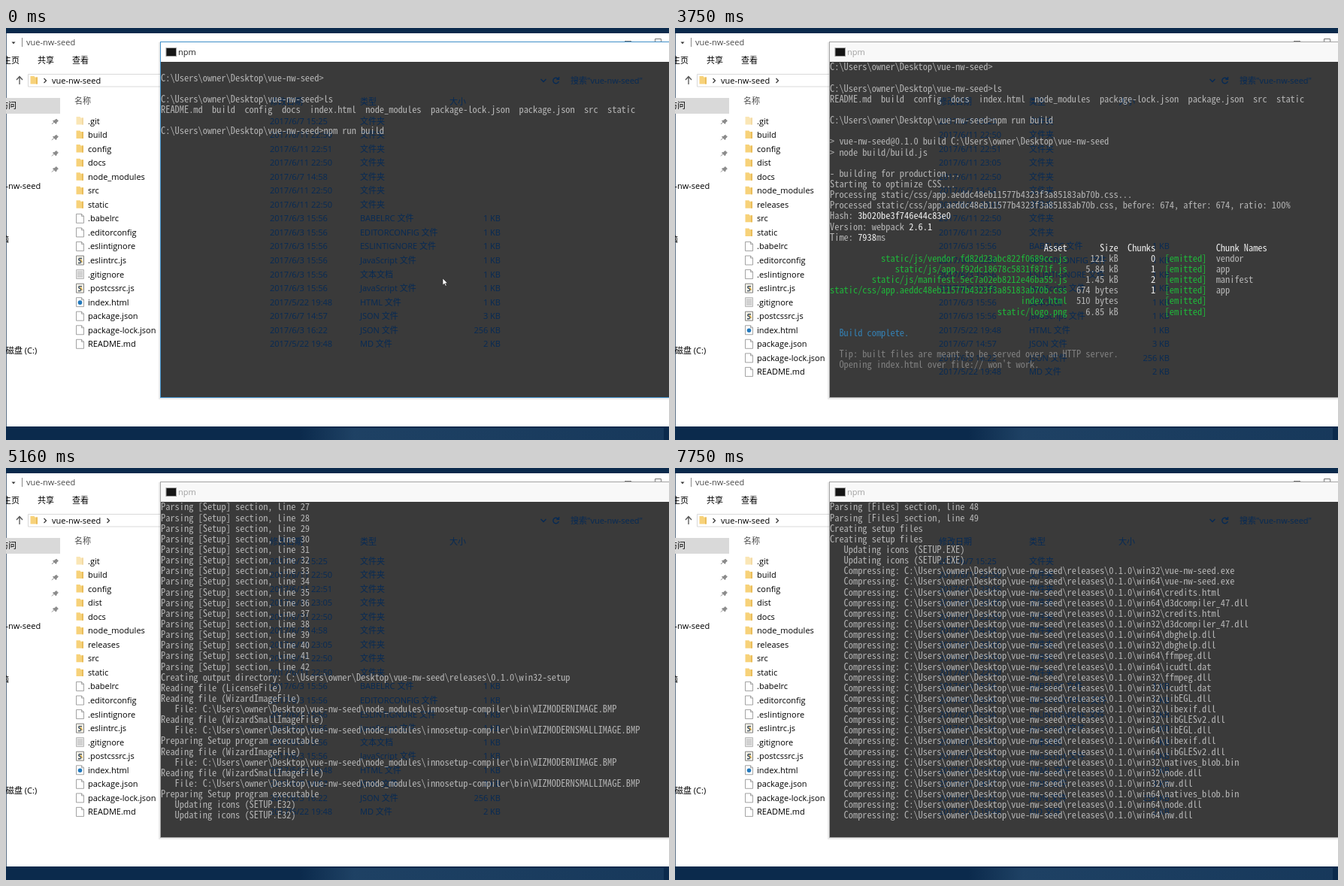
An HTML page that plays this animation: 882 px wide and 548 px high, repeating every 8000 ms.

```html
<!DOCTYPE html>
<html lang="zh-CN">
<head>
<meta charset="utf-8">
<title>npm run build</title>
<style>
html, body { margin: 0; width: 100%; height: 100%; overflow: hidden; background: #0b2a4c; }
#stage { position: absolute; left: 0; top: 0; width: 882px; height: 548px; overflow: hidden; }
svg { position: absolute; left: 0; top: 0; }
text { font: 11px "Open Sans", "Noto Sans CJK SC", sans-serif; white-space: pre; fill: #000; }
text.soft { fill: #4c4c4c; }
.under text { fill: #062a55; }
.end { text-anchor: end; }
#lines {
  position: absolute; left: 206px; top: 44.4px; width: 676px; height: 446px; margin: 0; overflow: hidden;
  font: 12.38px/14.15px "Noto Sans Mono CJK SC", "Liberation Mono", monospace;
  color: #b6b6b6; white-space: pre; font-variant-ligatures: none;
}
#lines div { height: 14.15px; }
b, i, u, em { font-style: normal; font-weight: inherit; text-decoration: none; }
b { color: #f0f0f0; }
i { color: #1fb83a; }
u { color: #3480b4; }
em { color: #808080; }
</style>
</head>
<body>
<div id="stage">
  <svg id="scene" width="882" height="548" viewBox="0 0 882 548">
    <defs>
      <linearGradient id="glow">
        <stop offset="0" stop-color="#23476a" stop-opacity="0"/>
        <stop offset=".15" stop-color="#23476a" stop-opacity=".8"/>
        <stop offset="1" stop-color="#23476a" stop-opacity=".5"/>
      </linearGradient>
      <g id="folder"><path d="M.5 0h5l1 1.500h3.500v9h-9.500z" fill="#f7d27a"/><path d="M8 1.500h2v9h-2z" fill="#e9bd5c"/></g>
      <g id="file"><path d="M.5 -.5h7l3 3v9h-10z" fill="#fff" stroke="#8c8c8c" stroke-width=".8"/><path d="M7.500 -.5v3h3" fill="none" stroke="#8c8c8c" stroke-width=".8"/></g>
      <g id="script"><path d="M.5 -.5h10v12h-10z" fill="#f2efe6" stroke="#777" stroke-width=".9"/><path d="M8 3H4.500q-2 1.500 1 3t0 3H3" fill="none" stroke="#3f4f60" stroke-width="1.400"/><path d="M6 4l2.500 4" stroke="#e0b03c" stroke-width="1.300"/></g>
      <g id="note"><path d="M.5 -.5h10v12h-10z" fill="#e4e4e4" stroke="#aaa" stroke-width=".8"/><path d="M2 2.500h7M2 4.500h7M2 6.500h7M2 8.500h7" stroke="#b6b6b6" stroke-width=".8"/></g>
      <g id="page"><use href="#file"/><circle cx="5.500" cy="6" r="2.800" fill="#2379bd"/></g>
      <path id="pin" d="M1 8l3-3M2.500 3.500l4 4 .8-2 2-2-2.500-2.500-2 2z" fill="#8b8b8b" stroke="#8b8b8b"/>
    </defs>

    <rect width="882" height="548" fill="#0b2a4c"/>
    <rect x="390" y="532" width="485" height="16" fill="url(#glow)"/>
    <rect x="0" y="7" width="882" height="523" fill="#fff"/>
    <path d="M.5 7V530" stroke="#5d7086"/>
    <path d="M7.500 18.500h5l-2.500 2.800z" fill="#333"/>
    <path d="M21.500 13v12" stroke="#888"/>
    <path d="M18 75v-10M14 69l4-4.500 4 4.500" fill="none" stroke="#555" stroke-width="1.300"/>
    <path d="M206 61.500H29.500v16.500H206" fill="none" stroke="#d9d9d9"/>
    <use href="#folder" x="32" y="64"/>
    <path d="M50.500 67l3 3-3 3" fill="none" stroke="#333" stroke-width="1.200"/>
    <path id="crumb" d="M134.500 67l3 3-3 3" fill="none" stroke="#333" stroke-width="1.200"/>
    <rect x="0" y="93" width="72" height="21" fill="#d9d9d9"/>
    <g id="labels"></g>
    <g id="names"></g>

    <path d="M823 17.500h9M863.500 18v-3.500h8v3.500" fill="none" stroke="#777"/>
    <rect x="203" y="19" width="690" height="475" fill="#000" opacity=".08"/>
    <rect x="205" y="18" width="690" height="474" fill="#3a3a3a"/>
    <rect id="bar" x="205" y="18" width="690" height="27"/>
    <rect id="frame" x="205.500" y="18.500" width="690" height="473" fill="none"/>
    <rect x="213" y="26.500" width="13.500" height="11" fill="#151515" stroke="#9b9b9b"/>
    <text id="caption" x="229" y="36">npm</text>
    <g class="under">
      <path d="M711.500 68l3.500 3.500 3.500-3.500M734.500 67.500a3.800 3.800 0 1 0 .8 3.500M735.500 65v3.200h-3.200" fill="none" stroke="#062a55" stroke-width="1.400"/>
      <g id="heads"></g>
      <g id="details"></g>
    </g>
  </svg>
  <pre id="lines"></pre>
  <svg width="882" height="548">
    <rect id="caret" x="206" width="6.200" height="2" fill="#c6c6c6"/>
    <path id="mouse" d="M0 0v9l2.200-2 1.500 3.300 1.500-.7-1.500-3.200h2.800z" fill="#fff" stroke="#222" stroke-width=".6"/>
  </svg>
</div>
<script>
const LOOP = 8000, ROWS = 30, ROW_HEIGHT = 14.15, TOP = 44.4;
const $ = id => document.getElementById(id);
const label = (x, y, text, cls = '') => `<text x="${x}" y="${y + 4}" class="${cls}">${text}</text>`;
const range = (from, to, make) => Array.from({ length: to - from + 1 }, (_, i) => make(from + i));

// Terminal output
const home = 'C:\\Users\\owner\\Desktop\\vue-nw-seed';
const bin = `   File: ${home}\\node_modules\\innosetup-compiler\\bin\\`;
const css = 'static/css/app.aeddc48eb11577b4323f3a85183ab70b.css';
const right = (text, width, tag) => ' '.repeat(width - text.length) + `<${tag}>${text}</${tag}>`;
const asset = (name, size, chunk = '', title = '') =>
  right(name, 51, 'i') + size.padStart(11) + right(chunk, 8, 'b') + `  <i>[emitted]</i>  ${title}`;
const parsing = (section, ...numbers) => numbers.map(n => `Parsing [${section}] section, line ${n}`);
const setupLines = from => range(from, 42, n => parsing('Setup', n)[0]);
const engine = ['', 'Compiler engine version: Inno Setup 5.5.9 (u)', ''];
const images = [
  'Reading file (WizardImageFile)', bin + 'WIZMODERNIMAGE.BMP',
  'Reading file (WizardSmallImageFile)', bin + 'WIZMODERNSMALLIMAGE.BMP',
  'Preparing Setup program executable'
];
const messages = [bin + 'Default.isl', '   Messages in script file'];
const sections = [
  'Determining language code pages', ...messages,
  'Reading default messages from Default.isl',
  'Parsing [LangOptions], [Messages], and [CustomMessages] sections', ...messages,
  'Reading [Code] section', ...parsing('Tasks', 45), ...parsing('Icons', 56, 57, 58),
  ...parsing('Run', 65), ...parsing('Files', 48, 49)
];
const twice = text => [text, text];
const compress = (bits, ...files) =>
  files.map(file => `   Compressing: ${home}\\releases\\0.1.0\\win${bits}\\${file}`);

const log = [
  '', `${home}>`, '', `${home}>ls`,
  'README.md  build  config  docs  index.html  node_modules  package-lock.json  package.json  src  static',
  '', `${home}>npm run build`, '',
  `> vue-nw-seed@0.1.0 build ${home}`, '> node build/build.js', '',
  '- building for production...', 'Starting to optimize CSS...',
  `Processing ${css}...`, `Processed ${css}, before: 674, after: 674, ratio: 100%`,
  'Hash: <b>3b020be3f746e44c83e0</b>', 'Version: webpack <b>2.6.1</b>', 'Time: <b>7938</b>ms',
  right('Asset', 51, 'b') + right('Size', 11, 'b') + right('Chunks', 8, 'b') + ' '.repeat(13) + '<b>Chunk Names</b>',
  asset('static/js/vendor.fd82d23abc822f0689cc.js', '121 kB', '0', 'vendor'),
  asset('static/js/app.f92dc18678c5831f871f.js', '5.84 kB', '1', 'app'),
  asset('static/js/manifest.5ec7a02eb8212e46ba55.js', '1.45 kB', '2', 'manifest'),
  asset(css, '674 bytes', '1', 'app'),
  asset('index.html', '510 bytes'), asset('static/logo.png', '6.85 kB'), '',
  '  <u>Build complete.</u>', '',
  '  <em>Tip: built files are meant to be served over an HTTP server.</em>',
  "  <em>Opening index.html over file:// won't work.</em>", '',
  '(node:940) DeprecationWarning: Archiver.bulk() deprecated since 0.21.0', 'build nw done!',
  ...engine, ...setupLines(20), ...engine, ...setupLines(20),
  `Creating output directory: ${home}\\releases\\0.1.0\\win32-setup`,
  'Reading file (LicenseFile)', ...images, ...images,
  ...twice('   Updating icons (SETUP.E32)'),
  ...sections, ...sections,
  ...twice('Creating setup files'), ...twice('   Updating icons (SETUP.EXE)'),
  ...compress(32, 'vue-nw-seed.exe'), ...compress(64, 'vue-nw-seed.exe', 'credits.html', 'd3dcompiler_47.dll'),
  ...compress(32, 'credits.html', 'd3dcompiler_47.dll'), ...compress(64, 'dbghelp.dll'),
  ...compress(32, 'dbghelp.dll'), ...compress(64, 'ffmpeg.dll', 'icudtl.dat'),
  ...compress(32, 'ffmpeg.dll', 'icudtl.dat', 'libEGL.dll', 'libexif.dll', 'libGLESv2.dll'),
  ...compress(64, 'libEGL.dll', 'libexif.dll', 'libGLESv2.dll'),
  ...compress(32, 'natives_blob.bin', 'node.dll', 'nw.dll'),
  ...compress(64, 'natives_blob.bin', 'node.dll', 'nw.dll')
];

function showLog(count) {
  const visible = log.slice(Math.max(0, count - ROWS), count);
  $('lines').innerHTML = visible.map(line => `<div>${line}</div>`).join('');
}

// File manager
const folder = (name, date) => ({ name, date, type: '文件夹', icon: 'folder', size: '' });
const file = (name, date, type, icon = 'file', size = 1) => ({ name, date, type, icon, size: `${size} KB` });
const june3 = '2017/6/3 15:56', late = '2017/6/11 22:50', built = '2017/6/11 23:05', may = '2017/5/22 19:48';
const files = [
  file('.babelrc', june3, 'BABELRC 文件'), file('.editorconfig', june3, 'EDITORCONFIG 文件'),
  file('.eslintignore', june3, 'ESLINTIGNORE 文件'), file('.eslintrc.js', june3, 'JavaScript 文件', 'script'),
  file('.gitignore', june3, '文本文档', 'note'), file('.postcssrc.js', june3, 'JavaScript 文件', 'script'),
  file('index.html', may, 'HTML 文件', 'page'), file('package.json', '2017/6/7 14:57', 'JSON 文件', 'file', 3),
  file('package-lock.json', '2017/6/3 16:22', 'JSON 文件', 'file', 256), file('README.md', may, 'MD 文件', 'file', 2)
];
function listing(stage) {
  const output = (name, date) => stage ? [folder(name, date)] : [];
  return [
    folder('.git', '2017/6/7 15:25'), folder('build', late),
    folder('config', stage > 1 ? built : '2017/6/11 22:51'), ...output('dist', built),
    folder('docs', late), folder('node_modules', '2017/6/7 14:58'), ...output('releases', built),
    folder('src', late), folder('static', late), ...files
  ];
}
function showFiles(stage) {
  const rows = listing(stage).map((entry, i) => ({ ...entry, y: 123.5 + i * 18.55 }));
  $('names').innerHTML = rows.map(r =>
    `<use href="#${r.icon}" x="93" y="${r.y - 5.5}" opacity="${r.name === '.git' ? 0.55 : 1}"/>` + label(109, r.y, r.name)).join('');
  $('details').innerHTML = rows.map(r =>
    label(351, r.y, r.date) + label(471, r.y, r.type) + label(658, r.y, r.size, 'end')).join('');
}

$('labels').innerHTML = label(27, 19, 'vue-nw-seed', 'soft') + label(-4, 43, '主页') + label(42, 43, '共享') +
  label(88, 43, '查看') + label(61, 70, 'vue-nw-seed') + label(-8, 103, '访问') + label(-19, 209.5, 'vue-nw-seed') +
  label(-7, 281, '脑') + label(0, 429, '磁盘 (C:)') + label(91, 97, '名称', 'soft') +
  range(0, 3, i => `<use href="#pin" x="60" y="${120 + i * 21.2}"/>`).join('');
$('heads').innerHTML = label(351, 97.5, '修改日期') + label(471, 97.5, '类型') + label(590, 97.5, '大小') +
  label(751, 70, '搜索"vue-nw-seed"');

// Each track is a list of [start time, value].
const lineTrack = [[0, 7], [450, 11], [3750, 31], [4590, 33], [4760, 55], [4900, 76], [5020, 91], [5160, 99],
  [5560, 116], [5680, 133], [5800, 136], [5940, 141], [6060, 145], [7750, 157]];
const fileTrack = [[0, 0], [3750, 1], [6440, 2]];
const crumbTrack = [[0, 0], [3750, 1], [6320, 0], [6690, 1]];
const caretTrack = [[0, 0], [250, 1], [450, 0], [1340, 1], [1860, 0], [2350, 1], [2850, 0]];
const mouseTrack = [[0, '581 333'], [1740, '736 496'], [2110, '737 511'], [2230, '']];
const focusTrack = [[0, 1], [2850, 0]];
const at = (track, t) => track.filter(([start]) => start <= t).pop()[1];
const show = (id, on) => $(id).setAttribute('visibility', on ? 'visible' : 'hidden');

let shownLines, shownFiles;
function draw(t) {
  const count = at(lineTrack, t), stage = at(fileTrack, t), mouse = at(mouseTrack, t), focus = at(focusTrack, t);
  if (count !== shownLines) showLog(shownLines = count);
  if (stage !== shownFiles) showFiles(shownFiles = stage);
  show('crumb', at(crumbTrack, t));
  show('caret', at(caretTrack, t));
  $('caret').setAttribute('y', Math.round(TOP + Math.min(count, ROWS) * ROW_HEIGHT + 11));
  show('mouse', mouse);
  if (mouse) $('mouse').setAttribute('transform', `translate(${mouse})`);
  $('bar').setAttribute('fill', focus ? '#fff' : '#f8f8f8');
  $('frame').setAttribute('stroke', focus ? '#3f8fc9' : '#a3a3a3');
  $('caption').style.fill = focus ? '#222' : '#a0a0a0';
}
const begin = performance.now();
function tick() {
  draw((performance.now() - begin) % LOOP);
  requestAnimationFrame(tick);
}
tick();
</script>
</body>
</html>
```
